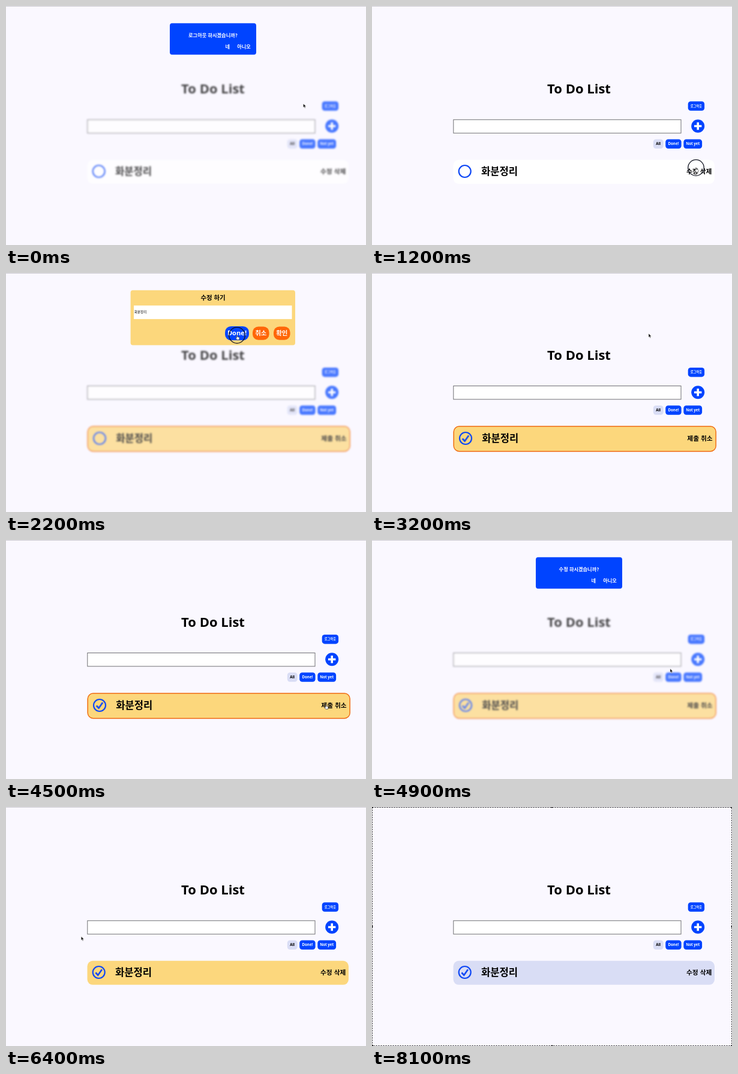
Recreate the animation shown at these times as an HTML page. Size 600 by 399 pixels, loop 8600 ms.

```html
<!DOCTYPE html>
<html lang="ko">
<head>
<meta charset="utf-8">
<title>To Do List</title>
<style>
  html, body { margin: 0; width: 100%; height: 100%; overflow: hidden; background: #faf8ff; }
  svg { display: block; width: 100vw; height: 100vh; }
  text { font-family: "Noto Sans CJK KR", "Noto Sans CJK", "Noto Sans", sans-serif; font-weight: 700; }
  .latin { font-family: "Noto Sans", "Open Sans", sans-serif; }
  .mid { text-anchor: middle; }
  .blue { fill: #0044ff; }
  .white { fill: #fff; }
  .lilac { fill: #d9ddf5; }
  .sand { fill: #fcd77c; }
  .orange { fill: #ff6608; }

  .t { animation: 8.6s step-end infinite; }
  .smooth { animation-timing-function: linear; }

  /* percent = ms / 86 */
  .page { animation-name: blur; }
  @keyframes blur {
    0%, 16.279%, 55.814% { filter: blur(1.7px); opacity: .72; }
    8.14%, 37.209%, 63.953%, 100% { filter: none; opacity: 1; }
  }
  .head { animation-name: lift; }
  @keyframes lift {
    0%, 63.953%, 100% { transform: none; }
    20.93% { transform: translateY(-1.3px); }
  }
  .row { animation-name: nudge; }
  @keyframes nudge {
    0%, 63.953%, 100% { transform: none; }
    20.93% { transform: translateX(1.3px); }
  }
  .fill { animation-name: fill; }
  @keyframes fill {
    0%, 19.767% { fill: #fff; }
    23.256%, 74.419% { fill: #fcd77c; }
    76.744%, 100% { fill: #d9ddf5; }
  }
  .frame { animation-name: frame; }
  @keyframes frame {
    0%, 19.767% { opacity: 0; }
    23.256%, 63.94% { opacity: 1; }
    63.953%, 100% { opacity: 0; }
  }
  .tick { animation-name: tick; }
  @keyframes tick { 0% { opacity: 0; } 26.744%, 100% { opacity: 1; } }
  .idle { animation-name: idle; }
  @keyframes idle { 0%, 63.953%, 100% { opacity: 1; } 16.279% { opacity: 0; } }
  .editing { animation-name: editing; }
  @keyframes editing { 0%, 63.953%, 100% { opacity: 0; } 16.279% { opacity: 1; } }

  .ask-out { animation-name: askOut; }
  @keyframes askOut { 0% { opacity: 1; } 8.14%, 100% { opacity: 0; } }
  .edit { animation-name: edit; }
  @keyframes edit { 0%, 37.209%, 100% { opacity: 0; } 16.279% { opacity: 1; } }
  .ask-edit { animation-name: askEdit; }
  @keyframes askEdit { 0%, 63.953%, 100% { opacity: 0; } 55.814% { opacity: 1; } }
  .done { transform-origin: 385px 100.5px; animation-name: grow; }
  @keyframes grow {
    0%, 23.256% { transform: none; }
    25%, 27.907% { transform: scale(1.05); }
    29.651%, 100% { transform: none; }
  }

  .pointer { animation-name: path; animation-timing-function: ease-in-out; }
  @keyframes path {
    0% { transform: translate(495.5px, 163px); }
    5.814%, 8.14% { transform: translate(397px, 67px); }
    10.465% { transform: translate(495px, 173px); }
    13.953%, 16.279% { transform: translate(540px, 270px); }
    19.767% { transform: translate(310px, 129px); }
    22.093% { transform: translate(346px, 40px); }
    24.419%, 27.326% { transform: translate(385px, 104px); }
    31.395%, 36.047% { transform: translate(460px, 102px); }
    37.209%, 40.698% { transform: translate(461px, 101px); }
    46.512% { transform: translate(149px, 279px); }
    50% { transform: translate(548px, 281px); }
    52.326%, 55.814% { transform: translate(533px, 275px); }
    59.302% { transform: translate(380px, 20px); }
    61.628%, 65.116% { transform: translate(371.5px, 67.5px); }
    72.093% { transform: translate(150px, 272px); }
    76.744%, 100% { transform: translate(101px, 161px); }
  }
  .arrow { animation-name: arrow; }
  @keyframes arrow {
    0%, 8.14%, 16.279%, 36.6%, 55.814%, 63.953% { opacity: 1; }
    5.2%, 13.37%, 23.8%, 51.2%, 61%, 81.395%, 100% { opacity: 0; }
  }
  .hand { animation-name: hand; }
  @keyframes hand {
    0%, 8.14%, 16.279%, 36.6%, 55.814%, 63.953%, 100% { opacity: 0; }
    5.2%, 13.37%, 23.8%, 51.2%, 61% { opacity: 1; }
  }
  .ring { animation-name: ring; }
  @keyframes ring {
    0%, 8.14%, 15.116%, 26.744%, 36.047%, 55.233%, 63.953%, 100% { opacity: 0; }
    6.977%, 13.953%, 25%, 34.884%, 53.488%, 62.791% { opacity: 1; }
  }
  .select { animation-name: select; }
  @keyframes select { 0% { opacity: 0; } 81.395%, 100% { opacity: 1; } }
</style>
</head>
<body>
<svg viewBox="0 0 600 399" preserveAspectRatio="none">
  <rect width="600" height="399" fill="#faf8ff"/>
  <rect width="600" height="1" fill="#cfced4"/>

  <g class="page t">
    <g class="head t">
      <text class="latin mid" x="345" y="146" font-size="22" style="font-weight:600">To Do List</text>
      <rect class="blue" x="526.7" y="159.3" width="27.4" height="15.4" rx="4.5"/>
      <text class="white mid" x="540.4" y="168.8" font-size="5.2">로그아웃</text>
      <rect x="135.8" y="189.8" width="379.2" height="22.4" fill="#fff" stroke="#6f6f73"/>
      <circle class="blue" cx="543.2" cy="200.5" r="11"/>
      <path d="M537 200.5h12.4M543.2 194.300v12.4" stroke="#fff" stroke-width="3.6"/>
      <rect class="lilac" x="468.8" y="222.500" width="16.800" height="15.6" rx="4.5"/>
      <rect class="blue" x="489.2" y="222.500" width="26.400" height="15.6" rx="4.5"/>
      <rect class="blue" x="519.3" y="222.500" width="30.800" height="15.6" rx="4.5"/>
      <g class="mid" font-size="6.2">
        <text class="latin" x="477.2" y="232.2">All</text>
        <text class="latin white" x="502.4" y="232.2">Done!</text>
        <text class="latin white" x="534.7" y="232.2">Not yet</text>
      </g>
    </g>

    <rect class="fill t smooth" x="135.5" y="256.800" width="435.5" height="40" rx="9"/>
    <rect class="sand frame t smooth" x="136.2" y="256" width="437" height="41.700" rx="9" stroke="#f0690f" stroke-width="1.4"/>
    <g class="row t">
      <circle cx="154.700" cy="276" r="10" fill="none" stroke="#0f48f5" stroke-width="2.2"/>
      <path class="tick t" d="M149.400 276.500l3.900 4.200 6.600-9.400" fill="none" stroke="#0f48f5" stroke-width="2.6"/>
      <text x="182" y="282" font-size="16.6">화분정리</text>
      <g font-size="10.7">
        <text class="idle t" x="524" y="279.800">수정 삭제</text>
        <text class="editing t" x="524" y="279.800">제출 취소</text>
      </g>
    </g>
  </g>

  <g class="ask-out t" font-size="8.2">
    <rect class="blue" x="273" y="28.800" width="144" height="52.400" rx="4"/>
    <text class="white mid" x="345" y="52">로그아웃 하시겠습니까?</text>
    <text class="white" x="365.500" y="70.800">네</text>
    <text class="white" x="385.300" y="70.800">아니오</text>
  </g>

  <g class="ask-edit t" font-size="8.2">
    <rect class="blue" x="273" y="28.800" width="144" height="52.400" rx="4"/>
    <text class="white mid" x="345" y="52">수정 하시겠습니까?</text>
    <text class="white" x="365.500" y="70.800">네</text>
    <text class="white" x="385.300" y="70.800">아니오</text>
  </g>

  <g class="edit t" font-size="10.4">
    <rect class="sand" x="207.600" y="28.800" width="274.400" height="91.600" rx="4"/>
    <text class="mid" x="345" y="45">수정 하기</text>
    <rect class="white" x="213" y="54.300" width="263.500" height="22.600"/>
    <text x="214" y="67.300" font-size="5.5" style="font-weight:500">화분정리</text>
    <g class="done t smooth">
      <rect class="blue" x="366" y="89.500" width="38" height="22.300" rx="9.5"/>
      <text class="latin white mid" x="385" y="104" font-size="10.6">Done!</text>
    </g>
    <rect class="orange" x="411" y="89.500" width="27.600" height="22.300" rx="9.5"/>
    <text class="white mid" x="424.800" y="104.200">취소</text>
    <rect class="orange" x="446" y="89.500" width="27.600" height="22.300" rx="9.5"/>
    <text class="white mid" x="459.800" y="104.200">확인</text>
  </g>

  <g class="pointer t">
    <circle class="ring t" r="13.3" fill="none" stroke="#10131f" stroke-width="1.3"/>
    <path class="arrow t" d="M0 0v6.400l1.500-1.300 1 2.300 1.100-.5-1-2.200h2z" stroke="#fff" stroke-width=".5"/>
    <path class="hand t" d="M-.6 0q.7-.7 1.300 0v2.600l2.600.6q.9.300.8 1.200l-.5 3h-3.700l-2-2.800q-.2-1 .8-.7l.7.600z" fill="#fff" stroke="#222" stroke-width=".6"/>
  </g>

  <g class="select t" fill="none" stroke="#222">
    <rect x=".5" y=".5" width="599" height="398" stroke-dasharray="2 2"/>
    <path d="M298.500 .5h3M298.500 398.500h3M.5 198v3M599.500 198v3M0 .5h2M598 .5h2M0 398.500h2M598 398.500h2" stroke="#000" stroke-width="1.5"/>
  </g>
</svg>
</body>
</html>
```
